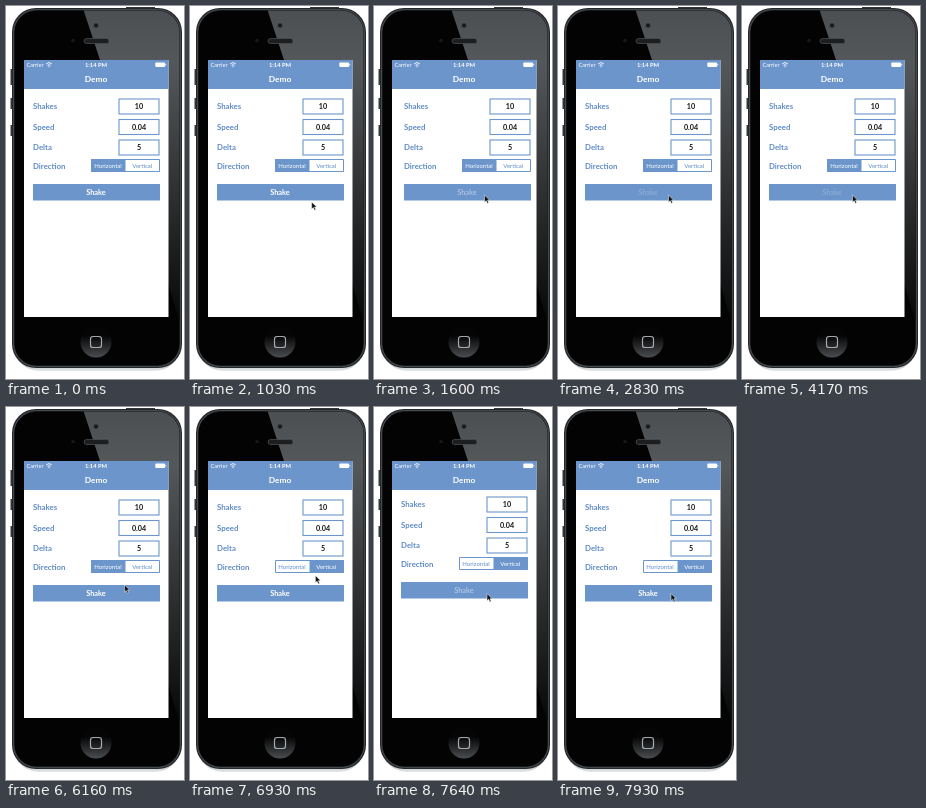
Animation, 178 px wide and 373 px high, one loop 7.99 s. Source, as an HTML page:

```html
<!DOCTYPE html>
<html lang="en">
<head>
<meta charset="utf-8">
<style>
  html, body { margin: 0; width: 100%; height: 100%; overflow: hidden; background: #fff; }
  svg { display: block; width: 178px; height: 373px; font-family: Lato, sans-serif; }
  .blue { fill: #6b95cb; }
  .box { fill: #fff; stroke: #6b95cb; }
  .label { fill: #5f8cc6; font-size: 7.8px; font-weight: bold; }
  .mid { text-anchor: middle; }
</style>
</head>
<body>
<svg viewBox="0 0 178 373">
  <defs>
    <linearGradient id="gloss" gradientUnits="userSpaceOnUse" x1="0" y1="5" x2="0" y2="330">
      <stop offset="0" stop-color="#4c4f52"/>
      <stop offset=".16" stop-color="#55585b"/>
      <stop offset="1" stop-color="#030303"/>
    </linearGradient>
    <linearGradient id="home" x2="0" y2="1">
      <stop offset=".3" stop-color="#050505"/>
      <stop offset="1" stop-color="#4a4d50"/>
    </linearGradient>
    <linearGradient id="shadow" x2="0" y2="1">
      <stop offset=".97" stop-color="#9aa1a7"/>
      <stop offset="1" stop-color="#e6e9eb"/>
    </linearGradient>
    <clipPath id="glass"><rect x="8.5" y="4.5" width="165" height="355" rx="22"/></clipPath>
    <clipPath id="screen"><path d="M18 54h144.5v257H18z"/></clipPath>
  </defs>

  <!-- Handset -->
  <rect x="8" y="10" width="166" height="355" rx="25" fill="url(#shadow)"/>
  <path d="M120 2h29M5.5 63v16M5.5 92v11M5.5 119v11" stroke="#33373b" stroke-width="2"/>
  <rect x="6" y="2" width="170" height="360" rx="24" fill="#25282b"/>
  <rect x="7.6" y="3.6" width="166.8" height="356.8" rx="22.6" fill="none" stroke="#575c61" stroke-width=".7"/>
  <g clip-path="url(#glass)">
    <path d="M8 4h166v356H8z" fill="#030303"/>
    <path d="M77.5 4L94 54l84 276V4z" fill="url(#gloss)"/>
  </g>
  <circle cx="90" cy="19.5" r="2.2" fill="#15181d" stroke="#3a3d40" stroke-width=".6"/>
  <circle cx="67" cy="34.5" r="1.8" fill="#17191c"/>
  <rect x="78" y="32.5" width="25" height="5" rx="2.5" fill="#1c1e20" stroke="#4a4d50" stroke-width=".8"/>
  <circle cx="90" cy="336" r="15.5" fill="url(#home)"/>
  <rect x="84.5" y="330.5" width="11" height="11" rx="2.6" fill="none" stroke="#a4a9ae" stroke-width="1.2"/>

  <g clip-path="url(#screen)">
    <path d="M18 54h145v257H18z" fill="#fff"/>
    <g id="content">
      <g id="form"></g>
      <path class="box" d="M85.5 153.5h68v12h-68z"/>
      <path id="choice" class="blue" d="M85 153h34.5v13H85z"/>
      <text id="horizontal" class="mid" x="102" y="161.9" font-size="6">Horizontal</text>
      <text id="vertical" class="mid" x="136.3" y="161.9" font-size="6">Vertical</text>
      <path class="blue" d="M27 178h127v16.5H27z"/>
      <text id="shake" class="mid" x="90" y="189" font-size="7.4" font-weight="bold" fill="#fff">Shake</text>
    </g>
    <path class="blue" d="M18 54h145v29H18z"/>
    <g fill="#fff">
      <text x="20.5" y="60.8" font-size="5.6">Carrier</text>
      <text class="mid" x="90" y="60.8" font-size="5.8" font-weight="bold">1:14 PM</text>
      <text class="mid" x="90" y="76.4" font-size="8.4" font-weight="bold">Demo</text>
      <rect x="149.3" y="56.5" width="9.8" height="4.4" rx="1"/>
      <path d="M159.4 58h.8v1.5h-.8z"/>
    </g>
    <path d="M40.2 57.8q2.8-2.4 5.6 0M41.5 59.3q1.5-1.2 3 0" fill="none" stroke="#fff" stroke-width=".9"/>
    <circle cx="43" cy="60.6" r=".7" fill="#fff"/>
  </g>
  <path id="cursor" d="M0 0v7.2l1.7-1.5 1.2 2.7 1.3-.6-1.2-2.6h2.2z" fill="#111" stroke="#fff" stroke-width=".5"/>
</svg>
<script>
const $ = id => document.getElementById(id);
const LOOP = 7990, BLUE = '#5f8cc6';

const rows = [['Shakes', 100.5, '10'], ['Speed', 121, '0.04'], ['Delta', 141.5, '5'], ['Direction', 159.8]];
$('form').innerHTML = rows.map(([name, y, value]) =>
  `<text class="label" x="27" y="${y + 2.9}">${name}</text>` + (value ?
  `<rect class="box" x="113" y="${y - 7.5}" width="40" height="15" stroke-width="1.1"/>
   <text class="mid" x="133" y="${y + 2.5}" font-size="7.2" font-weight="bold" fill="#151515">${value}</text>` : '')
).join('');

const bursts = [
  [600, 66, 11], [1440, 53.3, 3], [1600, 90, 2], [1750, 60, 4],
  [2830, 50, 2], [2940, 56.6, 7], [4170, 65, 9], [5700, 65.7, 8],
  [6220, 60, 3], [6520, 63.3, 13], [7460, 60, 5], [7776, 77, 3]
];
function hold(t) {
  let held = 0;
  for (const [start, step, count] of bursts)
    if (t >= start) held = start + step * Math.min(count - 1, Math.floor((t - start) / step));
  return held;
}

// [touch, start of shake]
const presses = [[1440, 1480], [2830, 2840], [4170, 4250], [7460, 7480]];
// Ten swings of 40 ms, then back to rest
function swing(t) {
  if (t <= 0 || t >= 440) return 0;
  const i = Math.floor(t / 40), p = t / 40 - i;
  const side = n => n === 0 || n === 11 ? 0 : n % 2 ? 1 : -1;
  const ease = (1 - Math.cos(Math.PI * p)) / 2;
  return 3 * (side(i) + (side(i + 1) - side(i)) * ease);
}

const clamp = p => Math.max(0, Math.min(1, p));
const smooth = p => p * p * (3 - 2 * p);
// [start, end, from, to, easing]
const moves = [
  [600, 1260, [180, 232], [110.5, 189], p => 1 - (1 - p) ** 2],
  [5700, 6340, [110.5, 189], [132, 159], p => p ** 3],
  [6650, 7280, [132, 159], [113, 186.5], smooth]
];
function cursorAt(t) {
  let at = [200, 232];
  for (const [start, end, from, to, ease] of moves)
    if (t >= start) {
      const p = ease(clamp((t - start) / (end - start)));
      at = from.map((v, i) => v + (to[i] - v) * p);
    }
  return at;
}

function draw() {
  const t = hold(performance.now() % LOOP);
  const vertical = t >= 6570;
  let offset = 0, alpha = 1;
  for (const [touch, start] of presses)
    if (t >= touch) {
      offset = swing(t - start);
      alpha = .2 + .8 * clamp((t - touch - 60) / 400);
    }
  $('content').setAttribute('transform', vertical ? `translate(0 ${offset})` : `translate(${offset} 0)`);
  $('shake').setAttribute('opacity', alpha);
  $('choice').setAttribute('transform', `translate(${vertical ? 34.5 : 0} 0)`);
  $('horizontal').setAttribute('fill', vertical ? BLUE : '#fff');
  $('vertical').setAttribute('fill', vertical ? '#fff' : BLUE);
  $('cursor').setAttribute('transform', `translate(${cursorAt(t)})`);
  requestAnimationFrame(draw);
}
draw();
</script>
</body>
</html>
```
